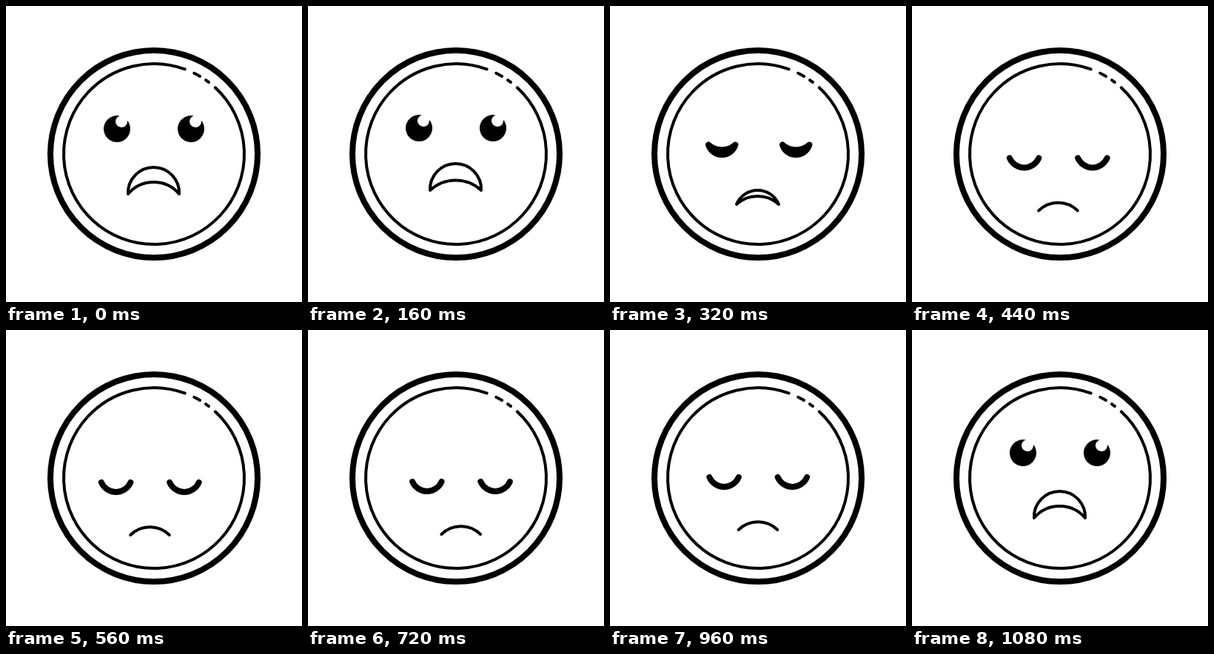
These frames come from a looping animation (400x400 px, 1.12 s). An HTML page:

```html
<!DOCTYPE html>
<html lang="en">
<head>
<meta charset="utf-8">
<title>Sad face</title>
<style>
  html, body { margin: 0; height: 100%; overflow: hidden; background: #fff; }
  svg { display: block; width: 100%; height: 100%; }
</style>
</head>
<body>
<svg viewBox="0 0 400 400" fill="none" stroke="#000" stroke-linecap="round" stroke-linejoin="round">
  <circle cx="200" cy="200" r="140" stroke-width="8"/>
  <circle cx="200" cy="200" r="122" stroke-width="4" pathLength="360"
    stroke-dasharray="337.3 6.4 4.2 4.4 2.3 5.4" transform="rotate(-47.3 200 200)"/>
  <path id="left" fill="#000"/>
  <path id="right" fill="#000"/>
  <path id="mouth" stroke-width="4"/>
</svg>
<script>
const LOOP = 1120, STEP = 40;
const [left, right, mouth] = ['left', 'right', 'mouth'].map(id => document.getElementById(id));

// Pose: time, eye x, eye gap, eye y, half width, tilt, lower sag, upper sag, stroke,
//       mouth x, mouth y, half width, outer sag, inner sag
const open = (t, eyeLift, mouthLift, inner) =>
  [t, 158.73, 100, 151.45 - eyeLift, 5.12, 3.07, 35, 13.3, 0, 199.5, 254 - mouthLift, 34.5, 36, inner];
const shut = (t, dx, dy) =>
  [t, 154.1 + dx, 92.3, 199 + dy, 19.7, 0, 13, 13, 8, 200 + dx, 270 + dy, 26.3, 10.8, 10.8];

const keys = [
  open(0, 0, 0, 16),
  open(160, 1, 5, 13.5),
  [320, 151.2, 100, 187.5, 18.2, 0, 13.5, 7, 8, 199.5, 268, 28.5, 19, 11],
  shut(440, -2.5, 6.5),
  shut(560, -5.5, 7),
  shut(640, -0.9, 7.6),
  shut(720, 6.7, 6),
  shut(800, 9.8, 3.8),
  shut(960, 0, 0),
  open(1080, 0, 0, 16),
  open(LOOP, 0, 0, 16)
];

const slope = (i, c) => (keys[i + 1][c] - keys[i][c]) / (keys[i + 1][0] - keys[i][0]);

// Flat at turning points, so the curve never overshoots a key
function tangent(i, c) {
  if (i === 0 || i === keys.length - 1) return 0;
  const a = slope(i - 1, c), b = slope(i, c);
  return a * b > 0 ? 2 * a * b / (a + b) : 0;
}

function poseAt(t) {
  const i = keys.findIndex((k, n) => t < keys[n + 1][0]);
  const a = keys[i], b = keys[i + 1], span = b[0] - a[0], u = (t - a[0]) / span;
  return a.map((v, c) => {
    const ease = u * u * (3 - 2 * u);
    return v + (b[c] - v) * ease + span * u * (1 - u) *
      (tangent(i, c) * (1 - u) - tangent(i + 1, c) * u);
  });
}

// Closed shape between two circular arcs that share their tips
function crescent(x, y, half, tilt, outer, inner, sweep) {
  const h = Math.hypot(half, tilt);
  const arc = (sag, dir, px, py) => {
    const r = (h * h + sag * sag) / (2 * sag);
    return `A${r} ${r} 0 ${+(sag > h)} ${dir} ${px} ${py}`;
  };
  return `M${x - half} ${y - tilt}` + arc(outer, sweep, x + half, y + tilt) +
    arc(inner, 1 - sweep, x - half, y - tilt) + 'Z';
}

function draw(now) {
  const t = Math.floor(now % LOOP / STEP) * STEP;
  const [, ex, gap, ey, half, tilt, low, high, line, mx, my, mHalf, outer, inner] = poseAt(t);
  [left, right].forEach((eye, i) => {
    eye.setAttribute('d', crescent(ex + i * gap, ey, half, tilt, low, high, 0));
    eye.setAttribute('stroke-width', line);
  });
  mouth.setAttribute('d', crescent(mx, my, mHalf, 0, outer, inner, 1));
  requestAnimationFrame(draw);
}
draw(performance.now());
</script>
</body>
</html>
```
